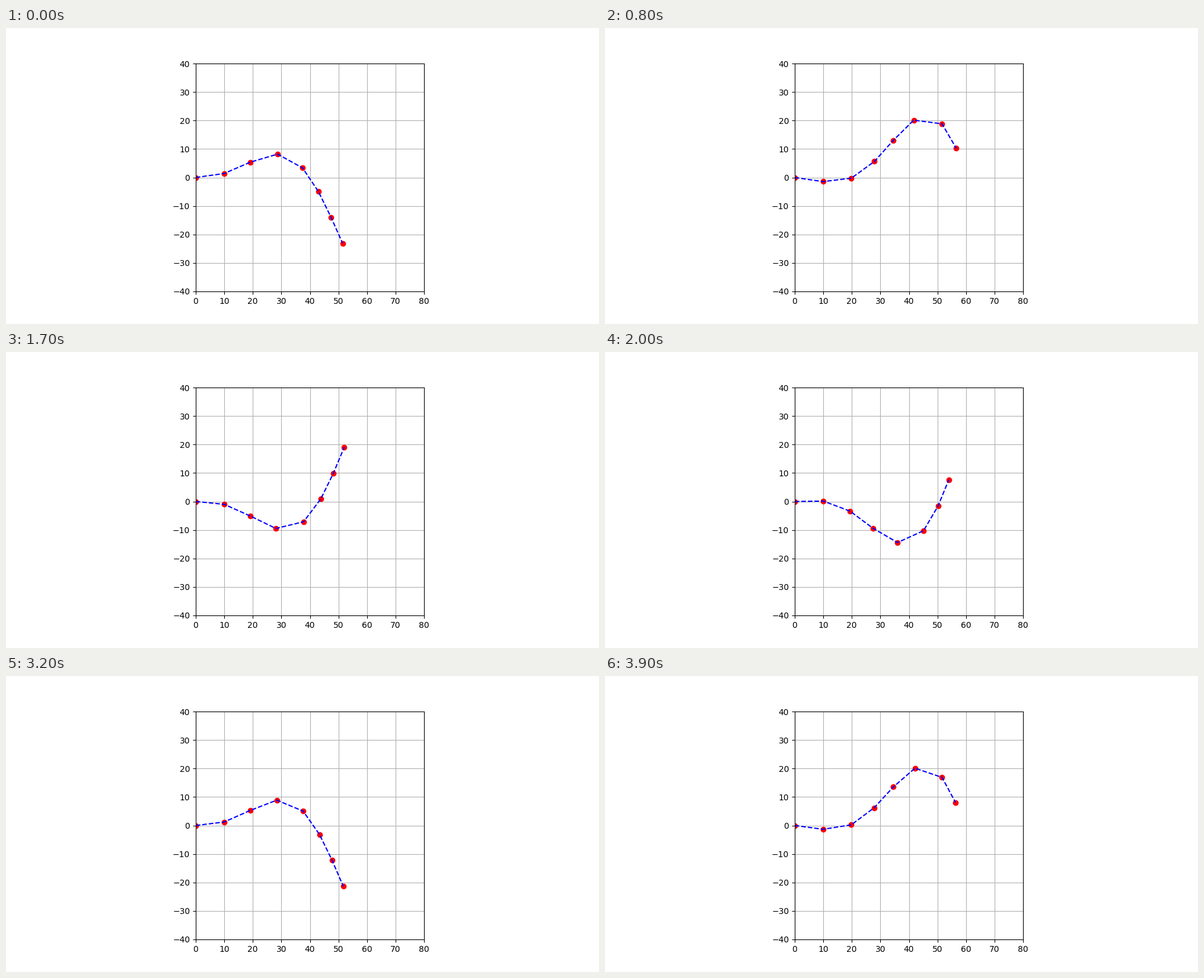
Animation of 1000 by 500 pixels, one loop 4000 ms. Source, as a matplotlib script:

```python
import numpy as np
import matplotlib.pyplot as plt
from matplotlib.animation import FuncAnimation

FRAMES, INTERVAL = 40, 100
LINKS, LINK_LENGTH = 7, 10
WAVE_NUMBER = np.pi / 40
PHASE_STEP = 0.2


def body_wave(x, phase):
    """Travelling wave whose amplitude grows along the body."""
    return (0.11 * x + 0.009 * x**2) * np.sin(WAVE_NUMBER * x - phase)


def next_joint(x, y, phase):
    """Bisect for the point on the wave one link further on."""
    low, high = x, x + LINK_LENGTH
    for _ in range(40):
        mid = (low + high) / 2
        if np.hypot(mid - x, body_wave(mid, phase) - y) < LINK_LENGTH:
            low = mid
        else:
            high = mid
    return high, body_wave(high, phase)


def chain(phase):
    joints = [(0.0, 0.0)]
    for _ in range(LINKS):
        joints.append(next_joint(*joints[-1], phase))
    return np.transpose(joints)


fig, ax = plt.subplots(figsize=(10, 5), dpi=100)
ax.set_aspect("equal")
ax.set_xlim(0, 80)
ax.set_ylim(-40, 40)
ax.set_xticks(range(0, 81, 10))
ax.set_yticks(range(-40, 41, 10))
ax.grid(True)
dots, = ax.plot([], [], "ro")
links, = ax.plot([], [], "b--")


def update(frame):
    x, y = chain(PHASE_STEP * frame)
    dots.set_data(x, y)
    links.set_data(x, y)
    return dots, links


anim = FuncAnimation(fig, update, frames=FRAMES, interval=INTERVAL, repeat=True)
plt.show()
```
